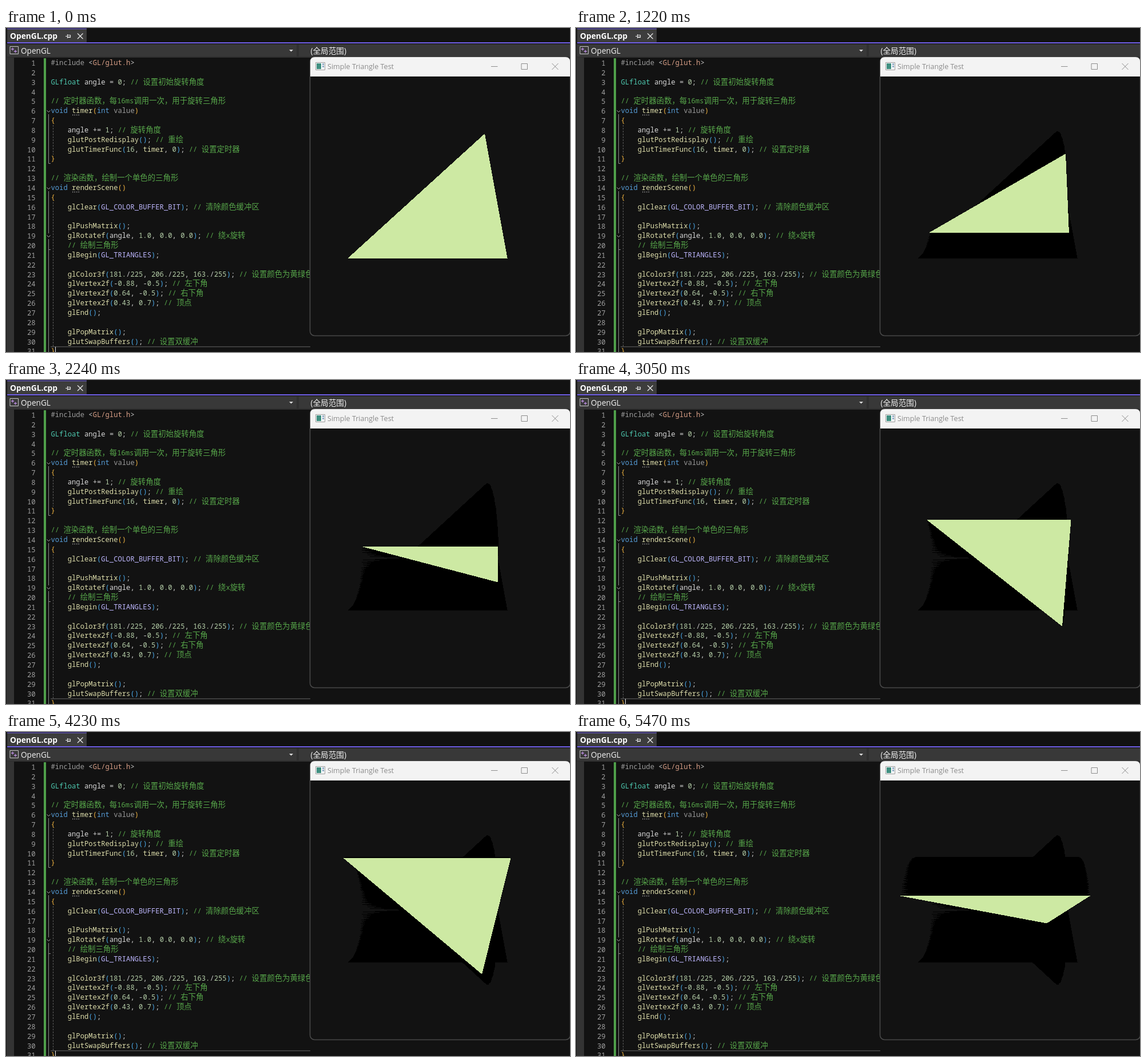
Recreate the animation shown at these times as an HTML page with a canvas. Size 986 px wide and 568 px high, loop 5.49 s.

```html
<!DOCTYPE html>
<html lang="zh-CN">
<head>
<meta charset="utf-8">
<title>Rotating triangle</title>
<style>
  html, body { margin: 0; width: 100%; height: 100%; overflow: hidden; background: #121212; }
  #stage { position: relative; width: 986px; height: 568px; overflow: hidden; background: #121212; }
  #stage > *, .line, .num { position: absolute; }
  svg, canvas { left: 0; top: 0; }
  .ui { font: 13.6px/20px "Open Sans", "Noto Sans CJK SC", "Noto Sans", sans-serif; color: #f2f2f2; white-space: nowrap; }
  .line, .num { font: 500 12.2px/17px "Noto Sans Mono", "DejaVu Sans Mono", monospace; white-space: pre; }
  .line { left: 78.5px; color: #d8d8d8; }
  .num { width: 51.5px; text-align: right; color: #a0a0a0; }
  .cjk { font: 13.4px/0 "Noto Sans CJK SC", "Noto Sans CJK", sans-serif; }
  .cm { color: #57a64a; } .pp { color: #9b9b9b; } .st { color: #d69d85; }
  .kw { color: #569cd6; } .ty { color: #4ec9b0; } .mc { color: #beb7ff; }
  .fn { color: #dcdcaa; } .par { color: #9a9a9a; } .lit { color: #b5cea8; }
  .op { color: #c8c8c8; } .b1 { color: #f0b340; } .b2 { color: #4aa8e8; }
  #caret { left: 86px; top: 559px; width: 1px; height: 9px; background: #eee; }
</style>
</head>
<body>
<div id="stage">
  <svg width="986" height="568" fill="none">
    <!-- tab strip and navigation bar -->
    <path fill="#3d3d3d" d="M2 1H141V26H2Z"/>
    <path fill="#7160e8" d="M2 1H141V2H2ZM2 25H986V27H2Z"/>
    <path fill="#303030" d="M1 28H986V52H1Z"/>
    <path fill="#383838" d="M2 29H508V50H2ZM512 29H986V50H512Z"/>
    <path stroke="#ddd" stroke-width="1.2" d="M104 14.500H107.500M107.500 11V18M107.500 12.500H112.500V16.500H107.500M108 15.800H112"/>
    <path stroke="#e6e6e6" stroke-width="1.4" d="M125 9.500L134.500 19M134.500 9.500L125 19"/>
    <path stroke="#c8c8c8" d="M7 32.500H21.500V45.500H7Z"/>
    <path stroke="#b58ad8" stroke-width="1.3" d="M9 37H14M11.500 34.500V39.500M14 41H19M16.500 38.500V43.500"/>
    <path fill="#ddd" d="M495 38H502L498.500 41.500Z"/>
    <!-- gutter -->
    <path fill="#333" d="M1 52H14V568H1Z"/>
    <path fill="#4f9f4a" d="M66 53H70V568H66Z"/>
    <path stroke="#8a8a8a" d="M74.500 151V237.500H78M74.500 286V360M74.500 370V388.500H78M74.500 388V568"/>
    <path stroke="#b0b0b0" d="M71.500 144.500L74.500 147.500L77.500 144.500M71.500 279.500L74.500 282.500L77.500 279.500M71.500 363.500L74.500 366.500L77.500 363.500"/>
    <path stroke="#5c5c5c" stroke-dasharray="3 2" d="M82.500 170V222M82.500 305V558"/>
    <path stroke="#a0a0a0" stroke-width="1.5" stroke-dasharray="1.500 2" d="M116 152.500H130M116 287.500H130"/>
    <path stroke="#4a4a4a" stroke-width="1.5" d="M78 558.700H532"/>
  </svg>
  <div class="ui" style="left:7px;top:4px;font-weight:700;font-size:13.75px;color:#fff">OpenGL.cpp</div>
  <div class="ui" style="left:26px;top:30px">OpenGL</div>
  <div class="ui" style="left:532.5px;top:30px">(全局范围)</div>
  <div id="code"></div>
  <div id="caret"></div>
  <svg width="986" height="568" fill="none">
    <rect x="531.5" y="51" width="455" height="488.500" rx="8" fill="#121212" stroke="#474747" stroke-width="1.600"/>
    <path fill="#f3f3f3" d="M532 85V59Q532 51 540 51H978Q986 51 986 59V85Z"/>
    <path fill="#fff" stroke="#9a9a9a" d="M541.500 60.500H557.500V73.500H541.500Z"/>
    <path fill="#3f8f80" d="M543 62H551V72H543Z"/>
    <path fill="#8fa9c4" d="M553 62H556V65H553ZM553 66H556V69H553Z"/>
    <path stroke="#8c8c8c" d="M848 67.500H859.500M901 62.500H911.500V72.500H901ZM954.500 62L965.500 73M965.500 62L954.500 73"/>
  </svg>
  <div class="ui" style="left:562px;top:57.500px;font-size:12.55px;color:#8b8b8b">Simple Triangle Test</div>
  <canvas id="view" width="986" height="568"></canvas>
</div>
<script>
const source = `#include <GL/glut.h>

GLfloat angle = 0; // 设置初始旋转角度

// 定时器函数，每16ms调用一次，用于旋转三角形
void timer(int value)
{
    angle += 1; // 旋转角度
    glutPostRedisplay(); // 重绘
    glutTimerFunc(16, timer, 0); // 设置定时器
}

// 渲染函数，绘制一个单色的三角形
void renderScene()
{
    glClear(GL_COLOR_BUFFER_BIT); // 清除颜色缓冲区

    glPushMatrix();
    glRotatef(angle, 1.0, 0.0, 0.0); // 绕x旋转
    // 绘制三角形
    glBegin(GL_TRIANGLES);

    glColor3f(181./225, 206./225, 163./255); // 设置颜色为黄绿色
    glVertex2f(-0.88, -0.5); // 左下角
    glVertex2f(0.64, -0.5); // 右下角
    glVertex2f(0.43, 0.7); // 顶点
    glEnd();

    glPopMatrix();
    glutSwapBuffers(); // 设置双缓冲
}`;

const token = /(?<cm>\/\/.*)|(?<pp>#\w+)|(?<st>\w+\/\w+\.h)|(?<kw>\b(?:void|int)\b)|(?<ty>GLfloat)|(?<mc>GL_\w+)|(?<fn>\w+(?=\()|timer)|(?<par>value)|(?<lit>\d[\d.]*)|(?<br>[(){}])|(?<id>[a-z]\w*)|(?<op>[^\w(){}])/g;

function add(parent, tag, cls, text = '') {
  const el = document.createElement(tag);
  el.className = cls;
  el.textContent = text;
  return parent.appendChild(el);
}

const code = document.getElementById('code');
source.split('\n').forEach((text, row) => {
  const top = 52 + row * 16.845;
  add(code, 'div', 'num', row + 1).style.top = top + 1 + 'px';
  const line = add(code, 'div', 'line');
  line.style.top = top + 'px';
  for (const m of text.matchAll(token)) {
    let kind = Object.keys(m.groups).find(k => m.groups[k] !== undefined);
    if (kind === 'br') kind = text[0] === ' ' ? 'b2' : 'b1';
    const span = add(line, 'span', kind);
    for (const part of m[0].match(/[\x00-\x7f]+|[^\x00-\x7f]+/g))
      add(span, 'span', part.charCodeAt(0) > 127 ? 'cjk' : '', part);
  }
});

const LOOP = 5490;

// Redraw times: [first, last, count]
const runs = [[30, 550, 12], [610, 1130, 12], [1160, 1670, 12], [1720, 2240, 11], [2280, 2820, 12],
  [2860, 3390, 12], [3440, 3960, 12], [4000, 4520, 11], [4550, 5050, 11], [5110, 5470, 9]];
const times = [0];
for (const [a, b, n] of runs)
  for (let i = 0; i < n; i++) times.push(Math.round((a + (b - a) * i / (n - 1)) / 10) * 10);

// Rotation in degrees over time
const turns = [[0, -2], [1220, 55], [2240, 105], [3050, 144], [4230, 199.6], [4850, 229.3], [5470, 257]];
function angleAt(t) {
  const i = Math.max(1, turns.findIndex(([time]) => time >= t));
  const [t0, a0] = turns[i - 1], [t1, a1] = turns[i];
  return a0 + (a1 - a0) * (t - t0) / (t1 - t0);
}

// Rotate about x, then project with a 45 degree camera at distance 3
const CX = 759, CY = 312, SCALE = 182.67, DIST = 3;
const corners = [[-0.88, -0.5], [0.64, -0.5], [0.43, 0.7]];
function project(t) {
  const a = angleAt(t) * Math.PI / 180;
  return corners.map(([x, y]) => {
    const s = SCALE * DIST / (DIST - y * Math.sin(a));
    return [CX + x * s, CY - y * Math.cos(a) * s];
  });
}

// Hard-edged fill: one whole-pixel span per row, no smoothing
function rasterize(points) {
  const path = new Path2D();
  const ys = points.map(p => p[1]);
  for (let row = Math.floor(Math.min(...ys)); row <= Math.max(...ys); row++) {
    const y = row + 0.5, xs = [];
    points.forEach(([x0, y0], i) => {
      const [x1, y1] = points[(i + 1) % 3];
      if (y0 > y !== y1 > y) xs.push(Math.round(x0 + (x1 - x0) * (y - y0) / (y1 - y0)));
    });
    if (xs.length) path.rect(Math.min(...xs), row, Math.abs(xs[1] - xs[0]), 1);
  }
  return path;
}
const poses = times.map(t => rasterize(project(t)));

const ctx = document.getElementById('view').getContext('2d');
const caret = document.getElementById('caret');
let shown = -1;

// Every earlier pose stays behind in black
function draw(index) {
  if (index < shown) shown = -1;
  if (shown < 0) ctx.clearRect(0, 0, 986, 568);
  ctx.fillStyle = '#000';
  for (let i = Math.max(shown, 0); i < index; i++) ctx.fill(poses[i]);
  ctx.fillStyle = '#cde9a3';
  ctx.fill(poses[index]);
  const t = times[index];
  caret.style.visibility = t >= 100 && (t - 100) % 1060 < 530 ? 'hidden' : 'visible';
  shown = index;
}

const start = performance.now();
function tick() {
  const t = (performance.now() - start) % LOOP;
  let index = times.length - 1;
  while (times[index] > t) index--;
  if (index !== shown) draw(index);
  requestAnimationFrame(tick);
}
tick();
</script>
</body>
</html>
```
